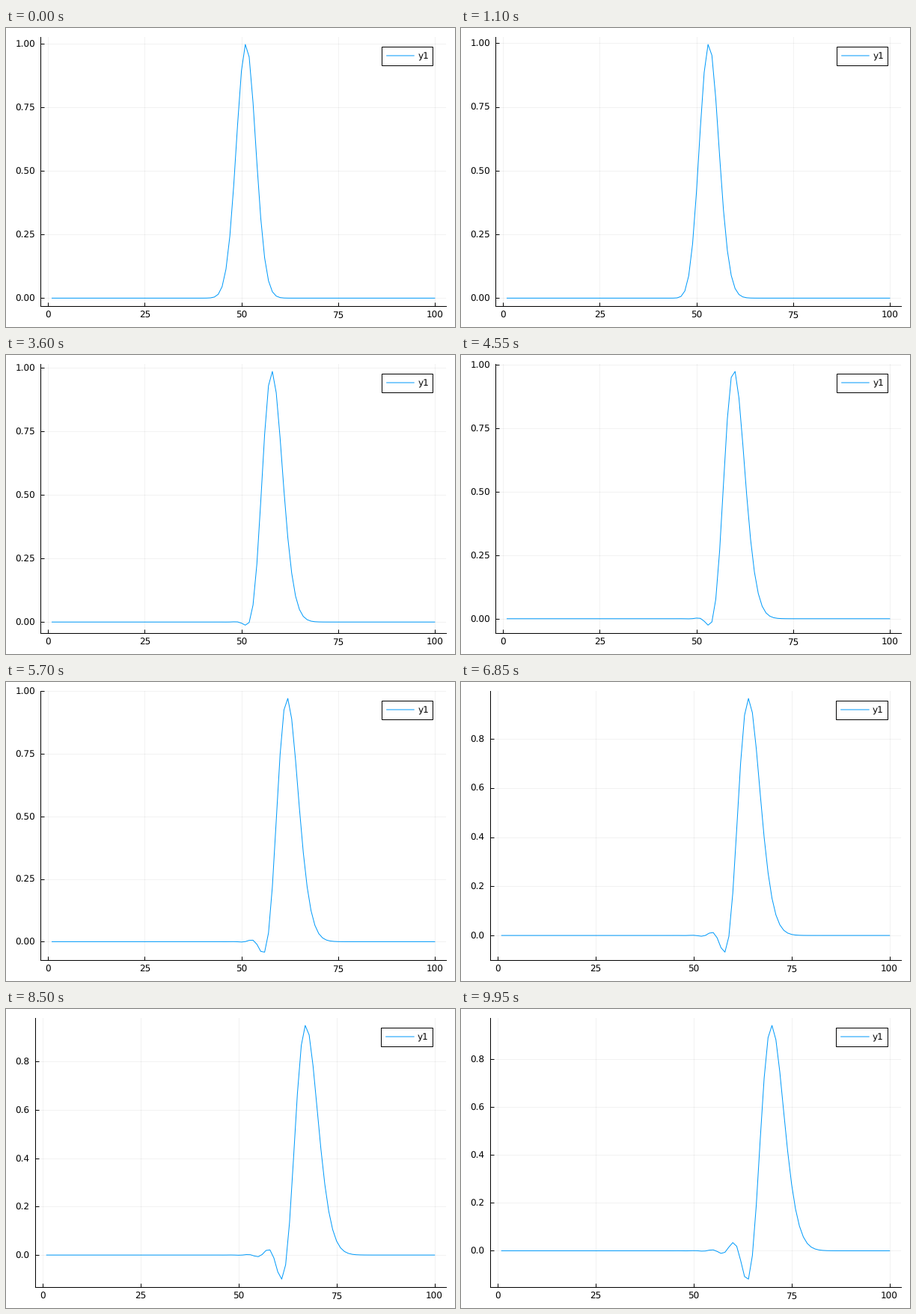
These frames come from a looping animation (600 px wide and 400 px high, 10 s). A matplotlib script:

```python
import numpy as np
import matplotlib as mpl
import matplotlib.pyplot as plt
from matplotlib.animation import FuncAnimation
from matplotlib.lines import Line2D
from matplotlib.patches import Rectangle
from matplotlib.transforms import Affine2D

W, H, DPI = 600, 400, 100
FRAMES, INTERVAL = 200, 50
PX = 72 / DPI  # one pixel in points
TOP, RIGHT, BOTTOM = 11.8, 588.2, 371.55
BLUE = "#009afa"
COURANT = 0.1

mpl.rcParams.update({
    "font.family": "DejaVu Sans",
    "font.size": 12 * PX,
    "text.hinting": "none",
    "axes.linewidth": PX,
})


def change(u):
    """One step of advection with central differences."""
    return -COURANT / 2 * (np.roll(u, -1) - np.roll(u, 1))


def advect():
    """Two-step Adams-Bashforth run of a Gaussian pulse, started with Euler."""
    x = np.arange(1, 101)
    old = np.exp(-0.08 * (x - 51.0) ** 2)
    now = old + change(old)
    states = []
    for _ in range(FRAMES):
        old, now = now, now + 1.5 * change(now) - 0.5 * change(old)
        states.append(now)
    return x, states


xs, waves = advect()

fig = plt.figure(figsize=(W / DPI, H / DPI), dpi=DPI, facecolor="white")
pixels = Affine2D().scale(1 / W, -1 / H).translate(0, 1) + fig.transFigure

ax = fig.add_axes([0, 0, 1, 1])
ax.spines[["top", "right"]].set_visible(False)
ax.set_axisbelow(True)
ax.grid(color="black", alpha=0.05, linewidth=PX)
ax.tick_params(direction="in", length=5 * PX, width=PX)
ax.tick_params(axis="x", pad=7.5 * PX)
ax.tick_params(axis="y", pad=7.2 * PX)
ax.set_xlim(1 - 0.03 * 99, 100 + 0.03 * 99)
ax.set_xticks(range(0, 101, 25))
curve, = ax.plot(xs, waves[0], color=BLUE, linewidth=PX,
                 solid_joinstyle="round")

box = Rectangle((0, 24.9), 1, 25, facecolor="white", edgecolor="black",
                linewidth=PX, transform=pixels, zorder=2)
sample = Line2D([0, 1], [37, 37], color=BLUE, linewidth=PX, snap=False,
                transform=pixels, zorder=3)
fig.add_artist(box)
fig.add_artist(sample)
name = fig.text(0, 41.3, "y1", transform=pixels, va="baseline", zorder=3)


def layout(left, ticks, digits, legend_left):
    ax.set_position([left / W, 1 - BOTTOM / H,
                     (RIGHT - left) / W, (BOTTOM - TOP) / H])
    ax.set_yticks(ticks, [f"{t:.{digits}f}" for t in ticks])
    box.set_x(legend_left)
    box.set_width(570.1 - legend_left)
    sample.set_xdata([legend_left + 6.3, 545.2])
    name.set_x(legend_left + 48.4)


def update(i):
    u = waves[i]
    margin = 0.03 * (u.max() - u.min())
    low, high = u.min() - margin, u.max() + margin
    # Quarter ticks while 1.0 is in view, fifths otherwise
    if high >= 1:
        layout(46.2, np.arange(5) / 4, 2, 502.4)
    else:
        layout(38.7, np.arange(5) / 5, 1, 501.4)
    ax.set_ylim(low, high)
    curve.set_ydata(u)
    return curve, box, sample, name


anim = FuncAnimation(fig, update, frames=FRAMES, interval=INTERVAL,
                     init_func=lambda: update(0), repeat=True,
                     repeat_delay=0, blit=False)
plt.show()
```
